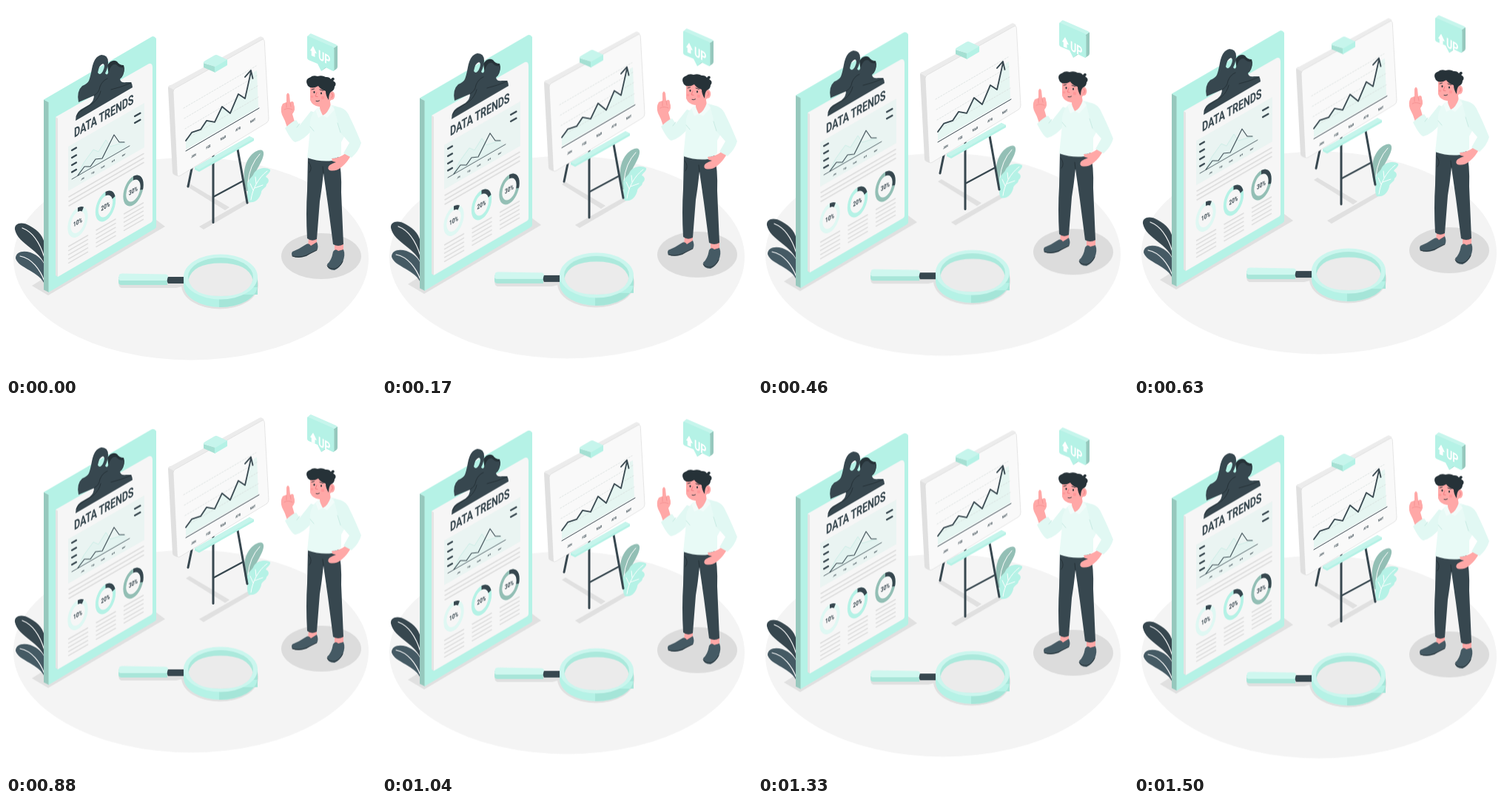
Recreate the animation shown at these times as an HTML page. Size 500 by 500 pixels, loop 1.54 s.

```html
<!DOCTYPE html>
<html lang="en">
<head>
<meta charset="utf-8">
<title>Data trends</title>
<style>
  html, body { margin: 0; height: 100%; overflow: hidden; background: #fff; }
  svg { display: block; width: 100vw; height: 100vh; }

  /* Every layer bobs linearly; nested layers add their own travel. */
  @keyframes bob {
    from { transform: translateY(calc(var(--d) * -.045)); }
    to   { transform: translateY(calc(var(--d) * .955)); }
  }
  .scene, .rise, .lag { animation: bob 770ms linear -35ms infinite alternate; }
  .scene { --d: -9.7px; }
  .rise  { --d: -20.4px; }
  .lag   { --d: 10px; }

  text { font-family: Roboto, "Liberation Sans", sans-serif; font-weight: 700; fill: #37474f; }
  .mid { text-anchor: middle; }
  .line { fill: none; stroke-linecap: round; stroke-linejoin: round; }
  .dark { fill: #37474f; }
  .ink { stroke: #37474f; }
  .deep { fill: #263238; }
  .mint { fill: #b5f2e6; }
  .light { fill: #c6f5ec; }
  .side { fill: #96c8bd; }
  .pale { fill: #e1f8f3; }
  .shade { fill: #e0e0e0; }
  .skin { fill: #ffa8a7; }
</style>
</head>
<body>
<svg viewBox="0 0 500 500" preserveAspectRatio="none">
  <defs>
    <path id="para" class="line" stroke="#dedede" stroke-width="1.5" d="M0 0l26-15M0 5.600l26-15M0 11.200l26-15M0 16.800l26-15M0 22.400l26-15"/>
    <circle id="ring" r="16.700" transform="rotate(-90)" fill="none" stroke-width="5.600" pathLength="100"/>
  </defs>

  <g class="scene">
    <!-- floor and shadows -->
    <ellipse cx="250" cy="341.500" rx="240" ry="137" fill="#f4f4f4"/>
    <g class="shade">
      <path d="M35 378L51 368L203 289L215 298L57 391Z"/>
      <path d="M243 243l5-3L302 272l-6 4ZM261 298L328 260l6 3L267 302Z"/>
      <path d="M153 372H238V379L230 381H156Q151 380 153 372Z"/>
      <ellipse cx="289" cy="377" rx="52" ry="32.500"/>
      <ellipse cx="426" cy="338" rx="54" ry="31" fill="#dcdcdc"/>
    </g>

    <!-- plant beside the easel -->
    <path fill="#93bfb5" d="M325 250C317 226 324 201 341 195Q349 193 348 201C346 214 331 228 329 250Z"/>
    <path class="mint" d="M328 265C324 257 328 250 326 243C325 234 333 233 335 226C339 219 351 217 357 221C358 225 353 227 351 231C356 233 356 238 352 241C352 246 345 247 345 252C343 260 337 267 328 265Z"/>
    <g class="line" stroke="#fff" stroke-width="1">
      <path d="M327 238Q329 215 343 200"/>
      <path d="M331 262C333 247 341 232 353 223M334 249L330 240M338 240L337 231M336 246L347 242"/>
    </g>

    <!-- easel -->
    <g class="rise">
      <g class="line ink" stroke-width="3">
        <path d="M252 215L246 244M312 188L326 266M280 195V292.500"/>
        <path d="M281 257.500L321 236" stroke-width="2.200"/>
      </g>
      <path class="shade" d="M219 111Q219 108 222 107L232 113V230Q225 228 225 225Z"/>
      <path d="M219 109L342 42Q345 40 349 44L228 114Z" fill="#ececec"/>
      <path d="M226 116Q226 113 229 111L346 45.500Q349 44 349.300 48L355 152Q355 156 352 158L235 229.500Q231.500 231 231.300 227Z" fill="#f9f9f9" stroke="#dcdcdc" stroke-width=".7"/>
      <path class="mint" d="M255 218L329 176L335 179V182L261 224L255 221Z"/>
      <path class="light" d="M255 218L329 176L335 179L261 221Z"/>
      <path fill="#a5e0d3" d="M267 77L283 82V90L267 83Z"/>
      <path class="mint" d="M282 81L299 72V80L282 90Z"/>
      <path class="light" d="M267 77Q266 76 269 74L281 67Q284 65 287 67L299 72.500L283 82Z"/>

      <g class="lag">
        <path d="M243 182L251 171 263 167 271 155 282 157 292 136 303 145 314 119 323 125 331 92 339 87 341 137 243 194Z" fill="#e6f6f2"/>
        <g class="line" stroke="#d9dfde" stroke-width=".8" stroke-dasharray="2 2">
          <path d="M240 138L338 81M241 152L339 94M242 166L340 108M243 180L341 123"/>
        </g>
        <g class="line ink">
          <path d="M243 196L342 138" stroke-width="1"/>
          <path d="M243 182L251 171 263 167 271 155 282 157 292 136 303 145 314 119 323 125 331 89M323 96L331 87 333.500 98" stroke-width="1.800"/>
        </g>
        <g class="mid" font-size="4.800">
          <text transform="matrix(.7 -.405 0 1 253.500 204)">JAN</text>
          <text transform="matrix(.7 -.405 0 1 273.500 192)">FEB</text>
          <text transform="matrix(.7 -.405 0 1 293.500 180)">MAR</text>
          <text transform="matrix(.7 -.405 0 1 313.500 168)">APR</text>
          <text transform="matrix(.7 -.405 0 1 333.500 156.500)">MAY</text>
        </g>
      </g>
    </g>

    <!-- plant behind the clipboard -->
    <path class="dark" d="M53 352C48 330 16 322 12 302C11 293 22 291 32 297C45 304 51 312 53 325Z"/>
    <path fill="#455a64" d="M53 378C46 358 17 355 13 341C13 332 23 330 33 333C44 337 50 344 53 352Z"/>
    <path class="line" stroke="#fff" stroke-width="1.200" d="M22 300C38 306 47 324 52 340M19 338C35 341 46 356 52 372"/>

    <!-- clipboard -->
    <path class="side" d="M51 126.500L58 130V387L51 383.500Z"/>
    <path class="mint" d="M51 126.500L197 41.500Q200 40 203 44V298Q203 300 201 301L57.500 387V130Z"/>
    <path d="M67 150L70 152V366L67 364Z" fill="#e4e4e4"/>
    <path d="M67 150L193 78Q198 77 198 83V289Q198 291 196 292.500L70 366V152Z" fill="#f6f6f6"/>
    <path d="M84 190L187 131V191L84 250Z" fill="#eaf4f2"/>
    <text font-size="18" letter-spacing="-.2" transform="matrix(.7 -.405 0 1 92 178)">DATA TRENDS</text>

    <path d="M97 229L105 212 118 194 125 197 135 181 141 190 160 184 165 190Z" fill="#e3f3f0"/>
    <g class="line ink">
      <path d="M89 195l6-3.500M89 205l6-3.500M89 215l6-3.500M89 224.500l6-3.500M174 149l7.500-4.300M174 158l7.500-4.300" stroke-width="2.200"/>
      <path d="M97 229L105 212 118 194 125 197 135 181 141 190 160 184" stroke="#c8ece5" stroke-width=".8"/>
      <path d="M97 229L106 217 114 217 121 207 130 206 146 174 153 184 160 184" stroke-width="1.100"/>
      <path d="M89 234L167 189" stroke-width=".8"/>
    </g>
    <g class="mid" font-size="3.200">
      <text transform="matrix(.7 -.405 0 1 103.500 234.500)">JAN</text>
      <text transform="matrix(.7 -.405 0 1 117.500 226.500)">FEB</text>
      <text transform="matrix(.7 -.405 0 1 131 218.500)">MAR</text>
      <text transform="matrix(.7 -.405 0 1 145 210.500)">APR</text>
      <text transform="matrix(.7 -.405 0 1 159 202.500)">MAY</text>
    </g>
    <path class="line" stroke="#dedede" stroke-width="1.500" d="M85 258L186 199.500M85 264L186 205.500M85 270L186 211.500"/>

    <g class="mid" font-size="9">
      <g transform="matrix(.7 -.405 0 1 97 292)">
        <use href="#ring" stroke="#dff8f3"/>
        <use href="#ring" class="ink" stroke-dasharray="10 90"/>
        <text y="3.200">10%</text>
      </g>
      <g transform="matrix(.7 -.405 0 1 134.500 270.500)">
        <use href="#ring" stroke="#b5f2e6"/>
        <use href="#ring" class="ink" stroke-dasharray="20 80"/>
        <text y="3.200">20%</text>
      </g>
      <g transform="matrix(.7 -.405 0 1 172 249.500)">
        <use href="#ring" stroke="#93bfb5"/>
        <use href="#ring" class="ink" stroke-dasharray="30 70"/>
        <text y="3.200">30%</text>
      </g>
    </g>
    <use href="#para" x="84.500" y="325"/>
    <use href="#para" x="122" y="303"/>
    <use href="#para" x="159.500" y="281"/>

    <!-- metal clip -->
    <path class="deep" d="M137 80Q143 71 150 75Q153 80 159 80Q162 88 156 97L140 102Z"/>
    <path class="dark" fill-rule="evenodd" d="M94 155Q94 145 101 140L113 133Q119 128 119 121L98 130Q95 115 103 108Q110 105 112 101Q114 96 116 85Q119 68 129 66Q138 66 138 76Q138 83 134 91Q137 95 139 88Q143 77 149 79Q153 84 159 83Q160 92 154 99Q155 104 162 103L169 103Q171 106 171 110ZM124 90Q127 95 131 88Q135 79 131 78Q126 79 124 90Z"/>
    <path class="line" stroke="#263238" stroke-width="1" d="M119 121Q126 117 127 109Q130 101 137 98M95 149Q97 144 104 140L118 131Q126 124 128 115M142 113Q155 110 169 104"/>

    <!-- magnifier -->
    <path d="M152 366H218V377H156Q152 377 152 373Z" fill="#a8e6d9"/>
    <path d="M152 368L153 363Q154 361.500 157 361.500L216 362.500Q219 363 219 366V371H155Q152 371 152 368Z" fill="#cff7ef"/>
    <path class="dark" d="M219 366H241V375H219Q216.500 371 219 366Z"/>
    <path class="mint" d="M240 366V377A50 30 0 0 0 340 377V366Z"/>
    <path d="M288 390H340V377A50 30 0 0 1 288 407Z" fill="#a5e5d8"/>
    <path d="M288 390L340 366V392H288Z" fill="#a5e5d8" clip-path="inset(0 0 12px 0)"/>
    <ellipse cx="290" cy="366" rx="50" ry="30.500" fill="#cbf6ee"/>
    <ellipse cx="290" cy="366" rx="44" ry="26" fill="#abe9dc"/>
    <path d="M246.500 370Q252 347.500 290 347.500T333.500 370Q328 392 290 392T246.500 370Z" fill="#ebebeb"/>

    <!-- presenter: legs -->
    <path class="skin" d="M409 313H420V326H408ZM444 320H456V333H444Z"/>
    <path fill="#455a64" d="M387 332Q397 328 404 323Q409 319 412 324L420 319Q423 326 420 330Q413 333 406 338Q394 342 387 338Q385 335 387 332ZM434 349Q440 344 442 332Q445 327 449 331L456 329Q459 336 455 346Q451 354 444 357Q434 357 434 349Z"/>
    <path class="line" stroke="#263238" stroke-width="1" d="M387 338Q395 341 406 337L420 330M434 351Q437 356 445 355Q452 352 455 345"/>
    <path class="dark" d="M408 203H449Q454 222 453 252L456 322Q449 326 442 322L435 268L429 226Q427 246 424 264L420 315Q413 319 407 314Q405 280 407 250Z"/>
    <path class="line" stroke="#263238" stroke-width="1" d="M429 226L428 217M409 211Q415 219 410 225"/>

    <!-- presenter: raised arm -->
    <path class="skin" d="M380 164Q377 154 373 147Q370 139 374 132L379 130L379 120Q381 115 383 120L384 130Q389 127 389 133Q392 140 387 146L391 160Z"/>
    <path class="line" stroke="#f38d8f" stroke-width=".8" d="M379 131V137M384 131L385 136M376 140Q381 137 387 140"/>
    <path class="pale" d="M377 165Q385 157 392 154L397 161L412 142L421 145L414 167Q403 181 391 184Q386 183 377 165Z"/>

    <!-- presenter: torso and hip arm -->
    <path class="skin" d="M467 200Q462 211 453 218Q446 224 437 222Q432 217 441 213L446 211Q438 210 440 206Q450 206 459 199Z"/>
    <path fill="#e8faf6" d="M421 138Q409 147 411 166Q409 188 407 205Q424 211 441 209L440 206Q449 206 453 201V184L466 160Q461 138 441 134Z"/>
    <path class="pale" d="M443 136Q459 136 464 149Q472 165 480 185Q477 196 467 205L456 199L464 185L452 171Z"/>
    <path class="line" stroke="#c4e9e1" stroke-width=".9" d="M393 164L397 159M452 171L448 158M416 169L411 163"/>
    <path class="skin" d="M424 129L437 123L439 136Q436 145 428 148Q423 144 424 129Z"/>
    <path fill="#f2fcfa" d="M423 137L428 148L422 151L418 140ZM439 133L444 140L434 151L428 148Q435 145 439 133Z"/>

    <!-- presenter: head -->
    <path class="skin" d="M411 108Q413 102 425 103L439 110L440 126Q433 136 423 136Q414 135 411 127Z"/>
    <ellipse class="skin" cx="440" cy="121" rx="4.300" ry="6"/>
    <path class="deep" d="M408 108Q403 99 411 96.500Q415 93 421 95Q427 93 432 96Q437 95.500 439 99Q441 96 443 97Q445 99 442 101Q448 104 444 109Q444 114 439 116Q436 119 436 127Q432 121 432 115Q425 113 422 108Q413 113 408 108Z"/>
    <g class="deep"><ellipse cx="416.500" cy="116.500" rx="1" ry="1.400"/><ellipse cx="426" cy="118" rx="1" ry="1.400"/></g>
    <g class="line" stroke-width=".9">
      <path stroke="#263238" d="M413 113L416.500 112M424 113L428.500 114.500M419 128.500Q421 129.500 423.500 128"/>
      <path stroke="#f0777c" d="M420 117L418 122L421 122.500M440 118Q443 120 440 124"/>
    </g>
    <g fill="#ff8f92" opacity=".6"><circle cx="428" cy="124" r="2.300"/><circle cx="413.500" cy="122.500" r="1.800"/></g>

    <!-- speech bubble -->
    <g class="rise">
      <path class="light" d="M407 41L411 37.500Q412 37 414 38L446 52Q448 53 448 55L443 59Z"/>
      <path class="side" d="M443 57L448 53.500V82Q448 84 446 85.500L442 88ZM426 88L433 83L431 81Z"/>
      <path class="mint" d="M407 42Q407 40 409 41L441 55Q443.500 56 443.500 59V86Q443.500 88.500 441 87.500L432 83L426 88L421 78L409 73Q407 72 407 70Z"/>
      <g class="lag">
        <path fill="#fff" d="M411 60L415 54L420 64.500L417.500 63.500V69L412.800 67V61Z"/>
        <text font-size="18" style="fill:#fff" transform="matrix(.7 .405 0 1 422 71.500)">UP</text>
      </g>
    </g>
  </g>
</svg>
</body>
</html>
```
